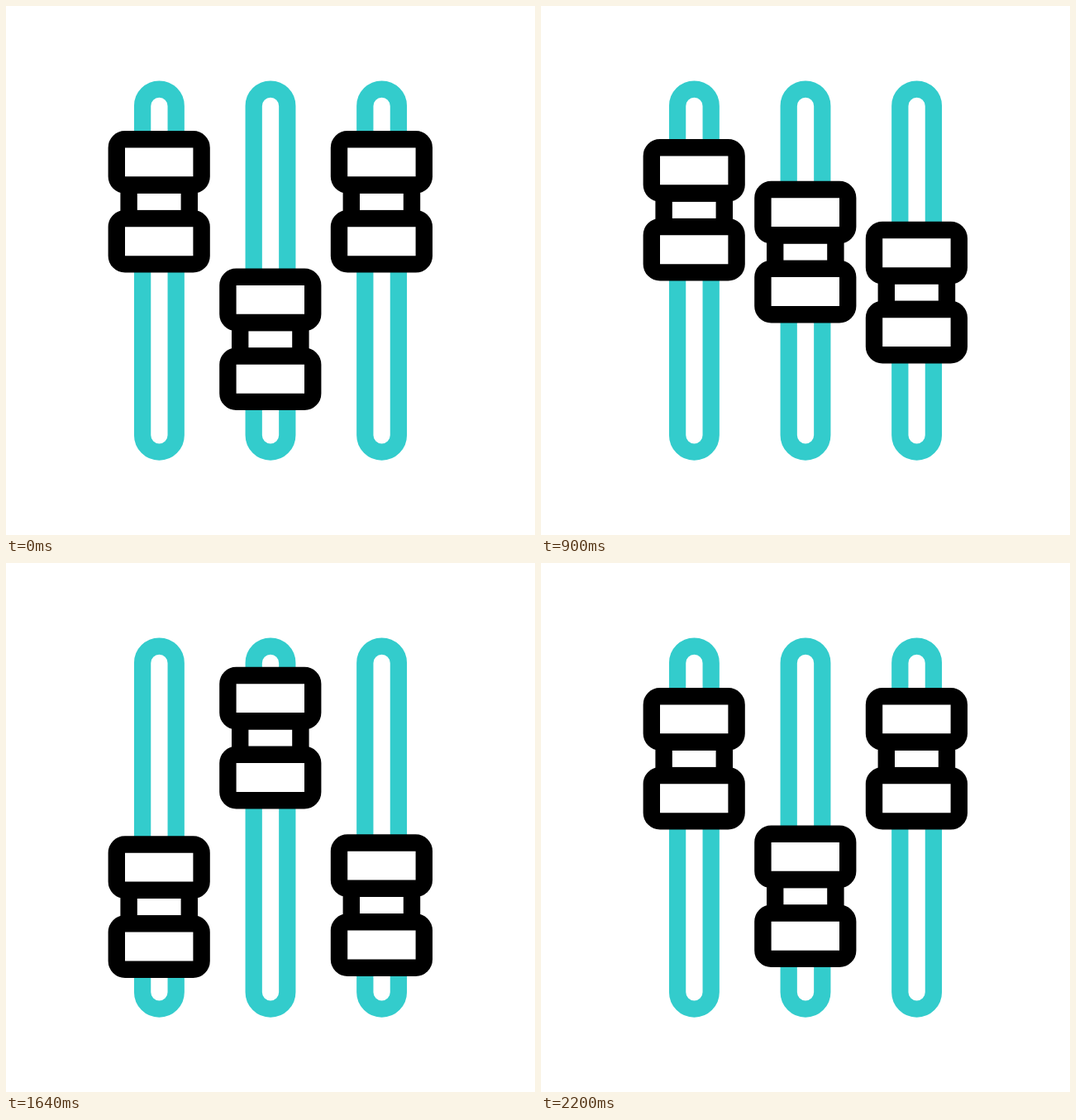
Write an HTML page that moves like this. It is 640x640 px and loops after 2300 ms.

```html
<!DOCTYPE html>
<html lang="en">
<head>
<meta charset="utf-8">
<title>Sliders</title>
<style>
  html, body { margin: 0; width: 100%; height: 100%; overflow: hidden; background: #fff; }
  svg { display: block; width: 100vw; height: 100vh; }
</style>
</head>
<body>
<svg viewBox="0 0 640 640">
  <defs>
    <rect id="rail" x="-20.3" y="100.6" width="40.6" height="439" rx="20.3"
          fill="#fff" stroke="#3cc" stroke-width="20.3"/>
    <g id="knob" fill="#fff" stroke="#000" stroke-width="20.4">
      <rect x="-36.8" y="65.5" width="73.2" height="40.6"/>
      <rect x="-51.6" y="10.2" width="102.8" height="55.3" rx="10.2"/>
      <rect x="-51.6" y="106.1" width="102.8" height="55.3" rx="10.2"/>
    </g>
  </defs>
</svg>
<script>
const LOOP = 2300, START = 200, STEP = 20;
const stops = [0, 480, 960, 1440, 2000];
const svg = document.querySelector('svg');

// tops: knob height at each stop; snap: how early the first and the last move get going.
const sliders = [
  { tops: [151, 266, 151, 330.3, 151], snap: [2.75, 2.85] },
  { tops: [317.5, 125.8, 233, 125.8, 317.5], snap: [1.97, 2.2] },
  { tops: [151, 343.6, 181, 328.3, 151], snap: [1, 1.45] }
];

const mix = (a, b, k) => a + (b - a) * k;
const smooth = k => k * k * (3 - 2 * k);
const ease = (k, snap) => smooth(1 - (1 - k) ** snap);

function use(id) {
  const node = document.createElementNS('http://www.w3.org/2000/svg', 'use');
  node.setAttribute('href', '#' + id);
  return svg.appendChild(node);
}

function place(node, x, y) {
  node.setAttribute('transform', `translate(${x} ${y})`);
}

sliders.forEach((slider, i) => {
  slider.x = 320 + (i - 1) * 134.6;
  place(use('rail'), slider.x, 0);
  slider.knob = use('knob');
});

function draw(elapsed) {
  const tick = Math.floor(elapsed % LOOP / STEP) * STEP;
  const time = Math.min(2000, Math.max(0, tick - START));
  const move = Math.min(3, stops.findLastIndex(stop => stop <= time));
  const progress = (time - stops[move]) / (stops[move + 1] - stops[move]);
  for (const { x, tops, snap, knob } of sliders) {
    const eased = ease(progress, mix(...snap, move / 3));
    place(knob, x, mix(tops[move], tops[move + 1], eased));
  }
}

const begin = performance.now();
function frame() {
  draw(performance.now() - begin);
  requestAnimationFrame(frame);
}
frame();
</script>
</body>
</html>
```
